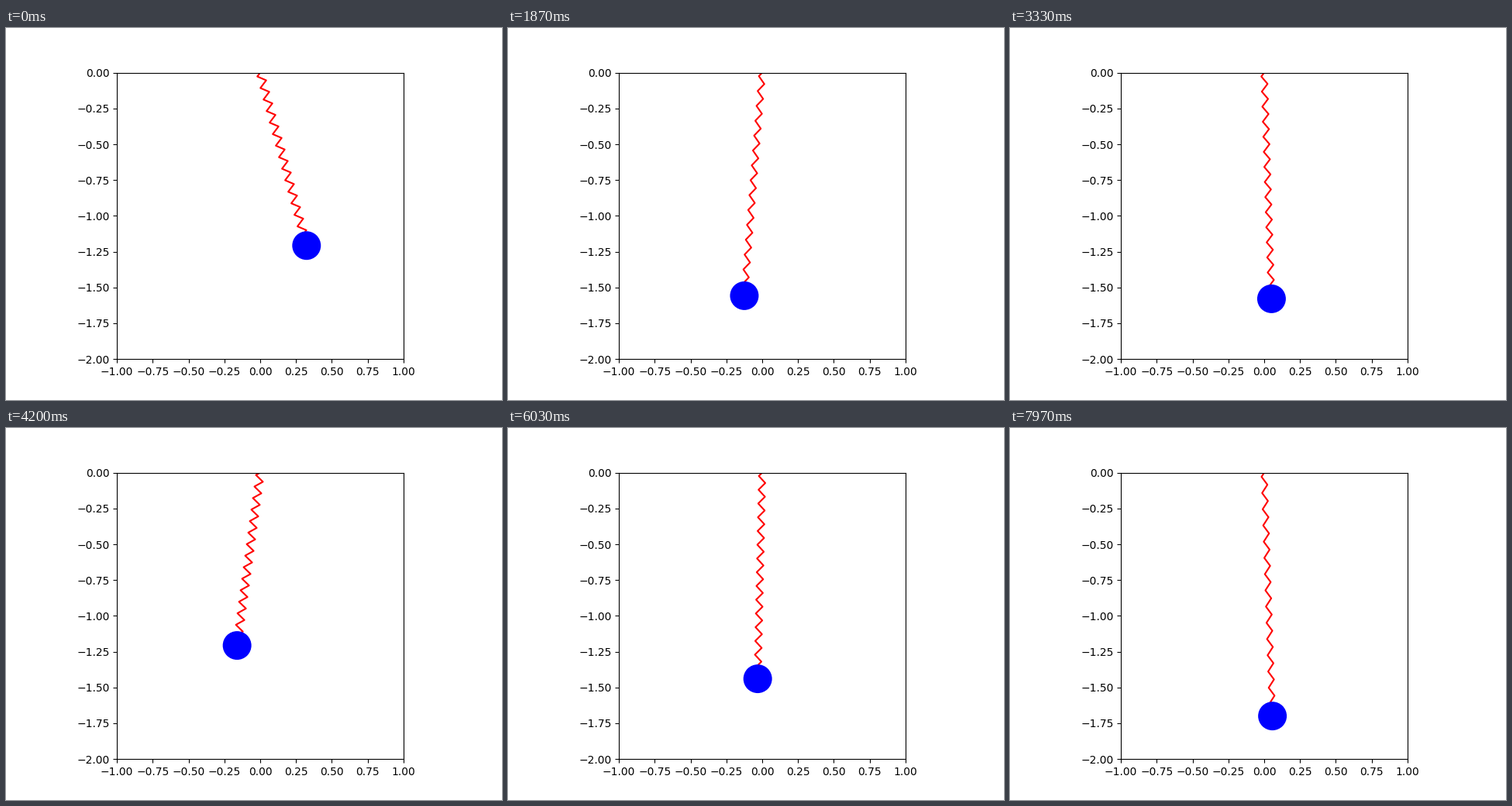
A matplotlib script for the animation above (8 s loop, 640x480 px).

```python
import numpy as np
import matplotlib.pyplot as plt
from matplotlib.animation import FuncAnimation
from matplotlib.patches import Circle

# Elastic pendulum: mass on a spring, released from rest
G = 9.81
K_OVER_M = 20.0
REST = 1.0
START_LEN, START_ANGLE = 1.25, np.radians(15)

FRAMES = 240
LOOP_MS = 8000
DT = 10 / 299
SUBSTEPS = 20

BOB_RADIUS = 0.1
SEGMENTS = 30


def rates(s):
    x, y, vx, vy = s
    pull = K_OVER_M * (1 - REST / np.hypot(x, y))
    return np.array([vx, vy, -pull * x, -pull * y - G])


def rk4(s, h):
    a = rates(s)
    b = rates(s + h / 2 * a)
    c = rates(s + h / 2 * b)
    d = rates(s + h * c)
    return s + h / 6 * (a + 2 * b + 2 * c + d)


def simulate():
    s = np.array([START_LEN * np.sin(START_ANGLE),
                  -START_LEN * np.cos(START_ANGLE), 0.0, 0.0])
    path = []
    for _ in range(FRAMES):
        path.append(s[:2])
        for _ in range(SUBSTEPS):
            s = rk4(s, DT / SUBSTEPS)
    return np.array(path)


def zigzag(x, y):
    """Points of a spring from the pivot to (x, y); it narrows as it stretches."""
    length = np.hypot(x, y)
    along = np.concatenate(([0], (np.arange(SEGMENTS) + 0.5) / SEGMENTS, [1]))
    side = np.zeros(SEGMENTS + 2)
    side[1:-1] = np.where(np.arange(SEGMENTS) % 2, 1, -1) / (SEGMENTS * length)
    return along * x - side * y / length, along * y + side * x / length


path = simulate()

fig, ax = plt.subplots(figsize=(6.4, 4.8), dpi=100)
ax.set_aspect("equal")
ax.set_xlim(-1, 1)
ax.set_ylim(-2, 0)

spring, = ax.plot([], [], color="red", lw=1.5)
bob = Circle(path[0], BOB_RADIUS, fc="blue", ec="none", zorder=2.2)
ax.add_patch(bob)


def update(i):
    x, y = path[i]
    spring.set_data(*zigzag(x, y))
    bob.center = x, y
    return spring, bob


anim = FuncAnimation(fig, update, frames=FRAMES, interval=LOOP_MS / FRAMES,
                     repeat=True, repeat_delay=0)
plt.show()
```
